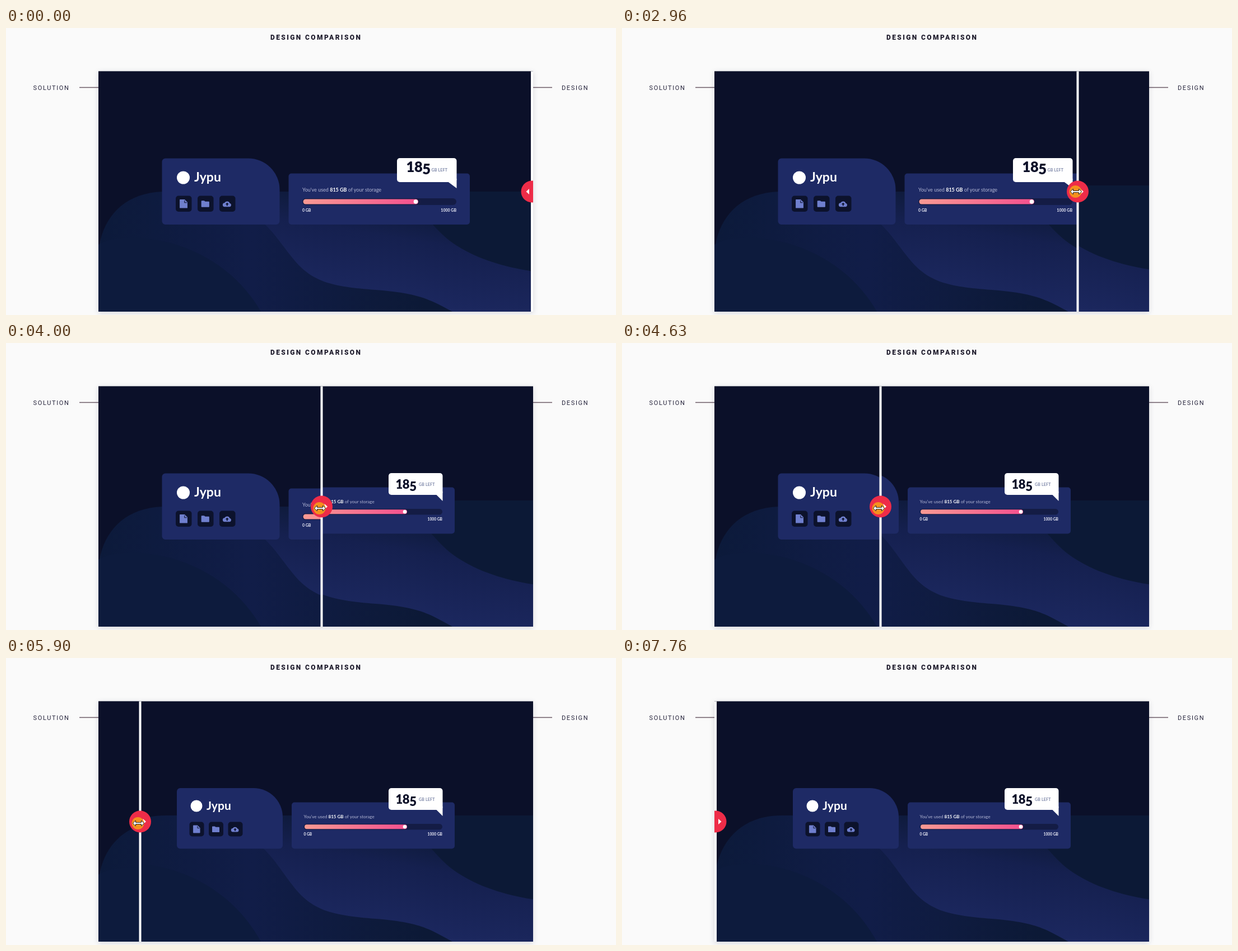
Write an HTML page that moves like this. It is 1089x514 px and loops after 9680 ms.

```html
<!DOCTYPE html>
<html lang="en">
<head>
<meta charset="utf-8">
<title>Design comparison</title>
<style>
  html, body { margin: 0; width: 100%; height: 100%; overflow: hidden; background: #fafafa; }
  svg { display: block; width: 1089px; height: 514px; font-family: Lato, sans-serif; }
  .page { font-family: Roboto, sans-serif; fill: #25233b; }
  .shadow { filter: drop-shadow(0 2px 5px rgba(20, 20, 50, .16)); }
  .bold { font-weight: 700; }
</style>
</head>
<body>
<svg viewBox="0 0 1089 514">
  <defs>
    <linearGradient id="base">
      <stop stop-color="#0c1a3a"/><stop offset=".35" stop-color="#111d48"/><stop offset=".75" stop-color="#0c1936"/>
    </linearGradient>
    <linearGradient id="band" gradientUnits="userSpaceOnUse" x1="600" y1="293" x2="570" y2="480">
      <stop stop-color="#0d1937"/><stop offset=".35" stop-color="#15204f"/><stop offset="1" stop-color="#1c2860"/>
    </linearGradient>
    <linearGradient id="fill">
      <stop stop-color="#f99a93"/><stop offset="1" stop-color="#f4508f"/>
    </linearGradient>
    <clipPath id="stage"><rect x="165" y="77.5" width="776" height="430.5"/></clipPath>
    <clipPath id="left"><rect id="leftBox" x="165" y="77.5" width="774" height="430.5"/></clipPath>
    <g id="waves">
      <path fill="url(#base)" d="M165 400C172 335 215 293 285 293H941V508H165Z"/>
      <path fill="url(#band)" d="M700 293C750 330 765 365 805 390S890 428 941 436V508H797C757 487 740 475 660 469S545 455 510 410S470 352 420 320V293Z"/>
      <path fill="#0d1b3d" d="M165 388C190 372 240 372 290 384C370 405 425 455 455 508H165Z"/>
    </g>
    <g id="doc"><path d="M-6-7H2L6.500-2.500V7H-6Z" stroke="#6f7fce" stroke-linejoin="round"/><path d="M2-6V-2H6" fill="none" stroke="#0c122c"/></g>
    <path id="folder" d="M-7-4.500Q-7-5.500-6-5.500H-2L0-4H6Q7-4 7-3V5Q7 6 6 6H-6Q-7 6-7 5Z"/>
    <g id="cloud"><path d="M-4 5.500A3.500 3.500 0 0 1-4.500-1.500A5 5 0 0 1 4.500-1A3.300 3.300 0 0 1 4 5.500Z"/><path d="M0-2L3 1H1V3.500H-1V1H-3Z" fill="#0c122c"/></g>
  </defs>

  <g class="page">
    <text x="472" y="20.500" font-size="12" font-weight="800" letter-spacing="2.400" fill="#1d1a2b">DESIGN COMPARISON</text>
    <g font-size="11" letter-spacing="1.650">
      <text x="48.500" y="110.500">SOLUTION</text>
      <text x="992" y="110.500">DESIGN</text>
    </g>
    <path d="M131 106.500H165M941 106.500H975" stroke="#6b5a66" stroke-width="1.400"/>
  </g>
  <rect class="shadow" x="165" y="77.500" width="776" height="430.500" fill="#fff"/>
  <g clip-path="url(#stage)">
    <g id="design"></g>
    <g id="solution" clip-path="url(#left)"></g>
    <g id="slider">
      <path d="M0 77V508" stroke="#fff" stroke-width="4"/>
      <circle cy="293" r="19.500" fill="#ee2c48"/>
      <path d="M-10.500 293L-5 288V298ZM10.500 293L5 288V298Z" fill="#fff"/>
    </g>
  </g>
  <g id="cursor">
    <circle id="press" cx="-1" r="11" fill="#f5901f"/>
    <path id="resize" d="M-10 0L-5-5V-1.500H5V-5L10 0L5 5V1.500H-5V5Z" fill="#fff" stroke="#222"/>
    <path id="arrow" d="M.5.500V14.500L3.700 11.600L5.800 16.500L8 15.500L6 10.800H10.300Z" fill="#fff" stroke="#111"/>
  </g>
</svg>
<script>
const $ = id => document.getElementById(id);

const box = (x, y, w, h, r, fill) =>
  `<rect x="${x}" y="${y}" width="${w}" height="${h}" rx="${r}" fill="${fill}"/>`;
const label = (x, y, size, fill, text, extra = '') =>
  `<text x="${x}" y="${y}" font-size="${size}" fill="${fill}" ${extra}>${text}</text>`;

function scene({ waveScale, card, corner, logo, name, buttons, panel, bubble, tail, big, unit, usage, track, bar, scale }) {
  const [x, y, w, h] = card, r = 6;
  const [bx, by, size, gap] = buttons;
  const icons = ['doc', 'folder', 'cloud'].map((id, i) =>
    box(bx + i * gap, by, size, size, 5, '#0c122c') +
    `<use href="#${id}" fill="#6f7fce" transform="translate(${bx + i * gap + size / 2 - .5} ${by + size / 2}) scale(${size / 28})"/>`);
  const right = bubble[0] + bubble[2], bottom = bubble[1] + bubble[3];
  const knob = bar[0] + bar[2] - bar[3] / 2;
  return box(165, 77, 776, 431, 0, '#0b1029') +
    `<use href="#waves" transform="translate(0 508) scale(1 ${waveScale}) translate(0 -508)"/>` +
    `<path fill="#1e2a65" d="M${x + r} ${y}h${w - r - corner}a${corner} ${corner} 0 0 1 ${corner} ${corner}v${h - corner - r}a${r} ${r} 0 0 1 ${-r} ${r}h${2 * r - w}a${r} ${r} 0 0 1 ${-r} ${-r}v${2 * r - h}a${r} ${r} 0 0 1 ${r} ${-r}"/>` +
    `<circle cx="${logo[0]}" cy="${logo[1]}" r="${logo[2]}" fill="#fff"/>` +
    label(...name, '#fff', 'Jypu', 'class="bold"') + icons.join('') +
    box(...panel, 5, '#1e2a65') + box(...bubble, 5, '#fff') +
    `<path fill="#fff" d="M${right - tail[0]} ${bottom - 1}L${right} ${bottom + tail[1]}V${bottom - 6}Z"/>` +
    label(...big, '#0c1029', '18<tspan dy="4">5</tspan>', 'font-weight="900" letter-spacing="-.4"') +
    label(...unit, '#7c86a8', 'GB LEFT', 'class="bold" letter-spacing=".2"') +
    label(...usage, '#b3b7d6', 'You\'ve used <tspan class="bold" fill="#fff">815 GB</tspan> of your storage') +
    box(...track, track[3] / 2, '#141c45') + box(...bar, bar[3] / 2, 'url(#fill)') +
    `<circle cx="${knob}" cy="${bar[1] + bar[3] / 2}" r="${bar[3] / 2 - .7}" fill="#fff"/>` +
    label(track[0], ...scale, '#f0f0fa', '0 GB', 'class="bold"') +
    label(track[0] + track[2], ...scale, '#f0f0fa', '1000 GB', 'class="bold" text-anchor="end"');
}

$('solution').innerHTML = scene({
  waveScale: 1, card: [278.5, 233.5, 210, 118.5], corner: 56,
  logo: [316.5, 268, 11.5], name: [336, 274.5, 23], buttons: [303, 300.5, 28.5, 39],
  panel: [504.5, 260.5, 323.5, 91.5], bubble: [698, 233, 106.5, 43], tail: [16, 11],
  big: [714.5, 258, 25.5], unit: [759.5, 257, 7], usage: [529, 293, 9],
  track: [529, 305, 275, 12], bar: [530.5, 306.5, 205.5, 9], scale: [329, 7]
});
$('design').innerHTML = scene({
  waveScale: 1.051, card: [305, 233, 189, 108.5], corner: 52,
  logo: [340, 265, 10.5], name: [358, 271.5, 21], buttons: [327.5, 293.5, 26, 34.5],
  panel: [510, 258.5, 291, 83], bubble: [683, 233, 96.5, 39], tail: [12, 11],
  big: [695.5, 260.5, 22], unit: [737, 255.5, 7], usage: [531.5, 287, 8.05],
  track: [531.5, 297, 247.5, 10.5], bar: [533, 298.2, 183, 8], scale: [318, 6.7]
});

const LOOP = 9680, PRESS = 2270, RELEASE = 7000, DRAG = 2470, STEP = 69.5;

// Slider centre by step of the drag.
const sliderKeys = [[-1, 933.5], [0, 926], [7, 813.5], [12, 733], [13, 743], [22, 563.5], [27, 495.5],
  [31, 461.5], [40, 357.5], [41, 366.5], [49, 239.5], [55, 185.5], [58, 167]];
// Pointer position by time, before and after the drag.
const pointerKeys = [[975, 1061, 506], [1150, 1048, 420], [1355, 1031, 352], [1630, 1031, 352],
  [1850, 975, 317], [1980, 928, 294], [2050, 933.5, 293], [6310, 182, 296], [6600, 157, 298],
  [7000, 157, 298], [7050, 154, 298], [7340, 154, 298], [7480, 235, 345], [7690, 490, 492], [7750, 560, 530]];

function at(keys, t) {
  let i = keys.findIndex(k => k[0] > t);
  if (i < 0) i = keys.length;
  if (i === 0 || i === keys.length) return keys[Math.max(0, i - 1)].slice(1);
  const a = keys[i - 1], b = keys[i], f = (t - a[0]) / (b[0] - a[0]);
  return a.slice(1).map((v, j) => v + (b[j + 1] - v) * f);
}

const show = (id, on) => $(id).setAttribute('visibility', on ? 'visible' : 'hidden');

function draw(now) {
  const t = now % LOOP;
  const step = Math.floor((t - DRAG) / STEP), held = DRAG + step * STEP;
  const slider = t < PRESS ? 939 : at(sliderKeys, Math.max(step, -1))[0];
  const dragging = t >= PRESS && held < 6300;
  const [x, y] = dragging
    ? [t < DRAG ? 933.5 : slider - 3, 293 + 3 * Math.min(1, Math.max(0, (t - 2960) / 700))]
    : at(pointerKeys, held);
  const visible = t >= 980 && t < 7760;
  const resizing = t >= PRESS && t < RELEASE || t < PRESS && x < 950;

  $('slider').setAttribute('transform', `translate(${slider} 0)`);
  $('leftBox').setAttribute('width', slider - 165);
  $('cursor').setAttribute('transform', `translate(${x} ${y})`);
  show('press', t >= PRESS && t < RELEASE);
  show('resize', visible && resizing);
  show('arrow', visible && !resizing);
  requestAnimationFrame(draw);
}
requestAnimationFrame(draw);
</script>
</body>
</html>
```
